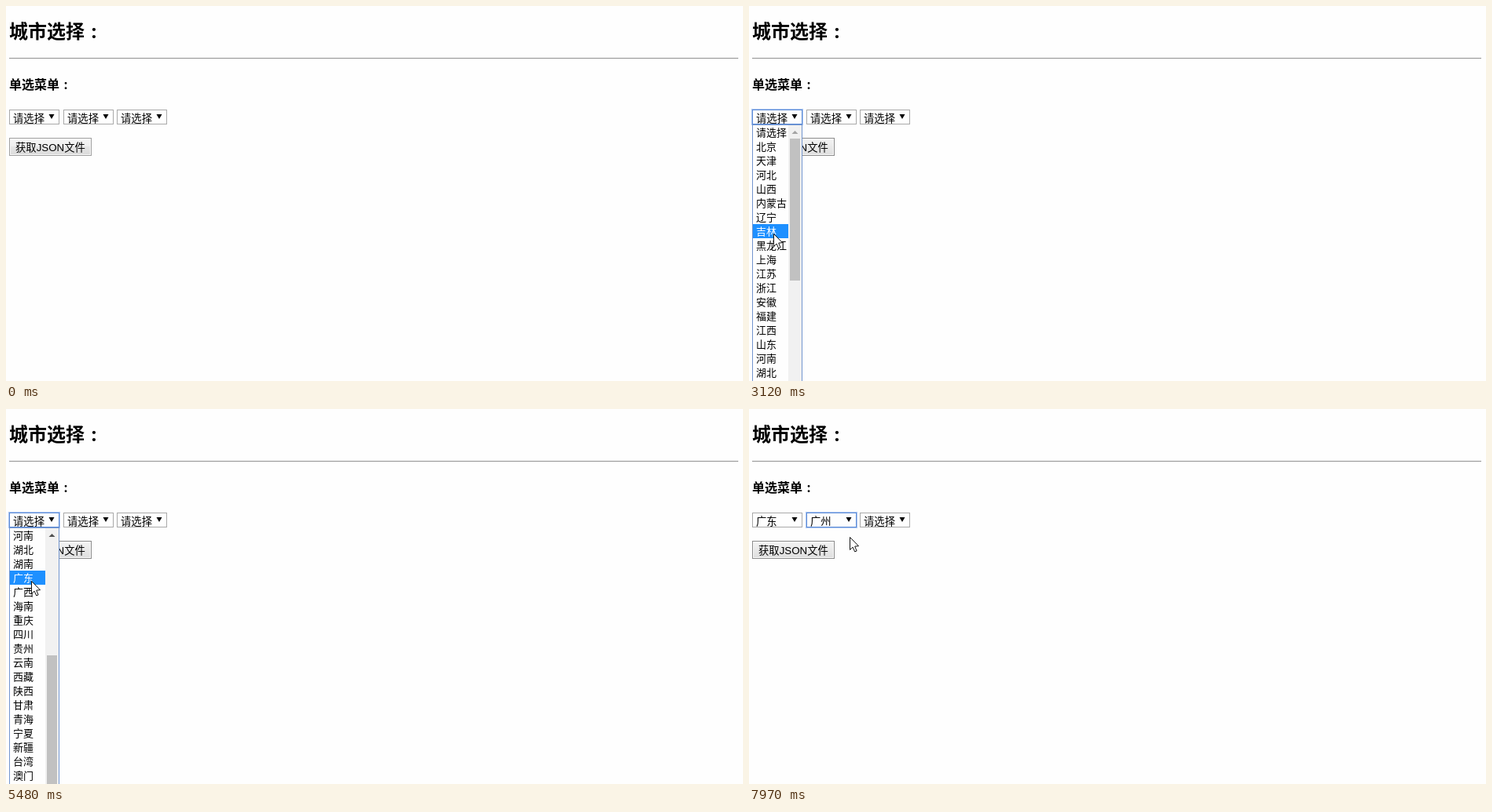
These frames come from a looping animation (938 px wide and 478 px high, 8000 ms). An HTML page with a canvas:

```html
<!DOCTYPE html>
<html lang="zh-CN">
<head>
<meta charset="utf-8">
<title>城市选择</title>
<style>
  html, body { margin: 0; height: 100%; overflow: hidden; background: #fefefe; }
  canvas { display: block; }
</style>
</head>
<body>
<canvas id="stage" width="938" height="478"></canvas>
<script>
const ctx = document.getElementById('stage').getContext('2d');
const LOOP = 8000;
const FONT = '"Liberation Sans", "Noto Sans CJK SC", sans-serif';
const PROMPT = '请选择';
const ROW = 18, LIST_TOP = 152;

const provinces = (PROMPT + ' 北京 天津 河北 山西 内蒙古 辽宁 吉林 黑龙江 上海 江苏 浙江 安徽 福建 江西 山东 ' +
  '河南 湖北 湖南 广东 广西 海南 重庆 四川 贵州 云南 西藏 陕西 甘肃 青海 宁夏 新疆 台湾 澳门 香港 海外').split(' ');
const cities = (PROMPT + ' 广州 深圳 东莞 中山 潮州 揭阳 云浮 珠海 汕头 韶关 佛山 江门 湛江 茂名 肇庆 惠州 ' +
  '梅州 汕尾 河源 阳江 清远').split(' ');

// Pointer glides: start time, time between steps, steps, target x, y
const glides = [
  [500, 144, 8, 47, 181],
  [1660, 143, 4, 44, 147],
  [2810, 154, 3, 31, 290],
  [3270, 127, 5, 25, 341],
  [3900, 129, 4, 27, 325],
  [4540, 129, 4, 31, 248],
  [5080, 199, 3, 32, 219],
  [5780, 134, 5, 107, 145],
  [6880, 133, 4, 102, 226],
  [7420, 134, 3, 98, 181],
  [7970, 100, 1, 128, 163]
];
const HOVER = 1364, OPEN_1 = 2400, SCROLL = 3524, PICK_1 = 5780, OPEN_2 = 6600, PICK_2 = 7970;

// Number of steps taken so far, from 0 to count
const stepsDone = (t, start, gap, count) =>
  Math.max(0, Math.min(count, Math.floor((t - start) / gap) + 1));

function pointerAt(t) {
  let x = 190, y = 500;
  for (const [start, gap, count, toX, toY] of glides) {
    const part = stepsDone(t, start, gap, count) / count;
    x += (toX - x) * part;
    y += (toY - y) * part;
    if (part < 1) break;
  }
  return { x: Math.round(x), y: Math.round(y) };
}

function box(x, y, w, h, fill) {
  ctx.fillStyle = fill;
  ctx.fillRect(x, y, w, h);
}

function frame(x, y, w, h, color) {
  ctx.strokeStyle = color;
  ctx.lineWidth = 1;
  ctx.strokeRect(x + 0.5, y + 0.5, w - 1, h - 1);
}

function text(str, x, y, size, color = '#000', weight = 400, font = FONT) {
  ctx.font = `${weight} ${size}px ${font}`;
  ctx.fillStyle = color;
  ctx.fillText(str, x, y);
}

function shape(points, fill, stroke) {
  ctx.beginPath();
  points.forEach(([x, y]) => ctx.lineTo(x, y));
  ctx.closePath();
  ctx.fillStyle = fill;
  ctx.fill();
  if (stroke) {
    ctx.strokeStyle = stroke;
    ctx.stroke();
  }
}

function heading(str, y, size) {
  text(str, 4, y, size, '#000', 700);
  ctx.textAlign = 'center';
  text(':', 4 + size * 4.5, y, size, '#000', 700, '"Noto Sans", sans-serif');
  ctx.textAlign = 'left';
}

function select(x, value, focused) {
  if (focused) frame(x - 1, 131, 66, 21, '#a9c4f0');
  box(x, 132, 64, 19, '#fefefe');
  frame(x, 132, 64, 19, focused ? '#5c8bd6' : '#a9a9a9');
  text(value, x + 5, 148, 13.333);
  shape([[x + 50.5, 138], [x + 57.5, 138], [x + 54, 144]], '#000');
}

function button(touched) {
  const shade = ctx.createLinearGradient(0, 169, 0, 190);
  const stops = touched
    ? [[0, '#f4f4f4'], [1, '#dedede']]
    : [[0, '#f6f6f6'], [0.5, '#eeeeee'], [0.5, '#e6e6e6'], [1, '#dadada']];
  stops.forEach(([at, color]) => shade.addColorStop(at, color));
  box(4, 168, 105, 23, shade);
  frame(4, 168, 105, 23, touched ? '#8c8c8c' : '#a0a0a0');
  frame(5, 169, 103, 21, '#f8f8f8');
  text('获取JSON文件', 12, 185, 13.333);
}

function dropdown(x, items, pointerY, scroll) {
  const track = 326, visible = 20 * ROW;
  const total = items.length * ROW;
  const active = Math.max(0, Math.floor((pointerY - LIST_TOP + scroll) / ROW));
  box(x, 151, 64, 327, '#fefefe');

  ctx.save();
  ctx.beginPath();
  ctx.rect(x, LIST_TOP, 64, 326);
  ctx.clip();
  items.forEach((item, i) => {
    const y = LIST_TOP + i * ROW - scroll;
    if (i === active) box(x + 1, y, 45, ROW, '#1e90ff');
    text(item, x + 5, y + 14, 13, i === active ? '#fff' : '#000');
  });
  box(x + 46, LIST_TOP, 17, 326, '#f1f1f1');
  box(x + 48, 169 + Math.round(scroll / total * track), 13, Math.round(visible / total * track), '#c1c1c1');
  shape([[x + 50.5, 163], [x + 58.5, 163], [x + 54.5, 159]], scroll ? '#505050' : '#a3a3a3');
  ctx.restore();

  frame(x, 151, 64, 340, '#7396cf');
}

function pointer({ x, y }) {
  ctx.save();
  ctx.translate(x + 0.5, y + 0.5);
  shape([[0, 0], [0, 16], [3.6, 12.6], [6.2, 18.4], [8.6, 17.4], [6.2, 11.6], [11, 11.2]], '#fff', '#111');
  ctx.restore();
}

function draw(t) {
  const cursor = pointerAt(t);
  box(0, 0, 938, 478, '#fefefe');
  heading('城市选择', 41, 24);
  box(4, 66, 928, 1, '#9a9a9a');
  box(4, 67, 928, 1, '#eeeeee');
  heading('单选菜单', 106, 16);

  select(4, t < PICK_1 ? PROMPT : '广东', t >= OPEN_1 && t < OPEN_2);
  select(73, t < PICK_2 ? PROMPT : '广州', t >= OPEN_2);
  select(141, PROMPT, false);
  button(t >= HOVER);

  if (t >= OPEN_1 && t < PICK_1) {
    dropdown(4, provinces, cursor.y, Math.min(288, 100 * stepsDone(t, SCROLL, 127, 3)));
  }
  if (t >= OPEN_2 && t < PICK_2) dropdown(73, cities, cursor.y, 0);
  pointer(cursor);
}

function tick() {
  draw(performance.now() % LOOP);
  requestAnimationFrame(tick);
}
tick();
</script>
</body>
</html>
```
